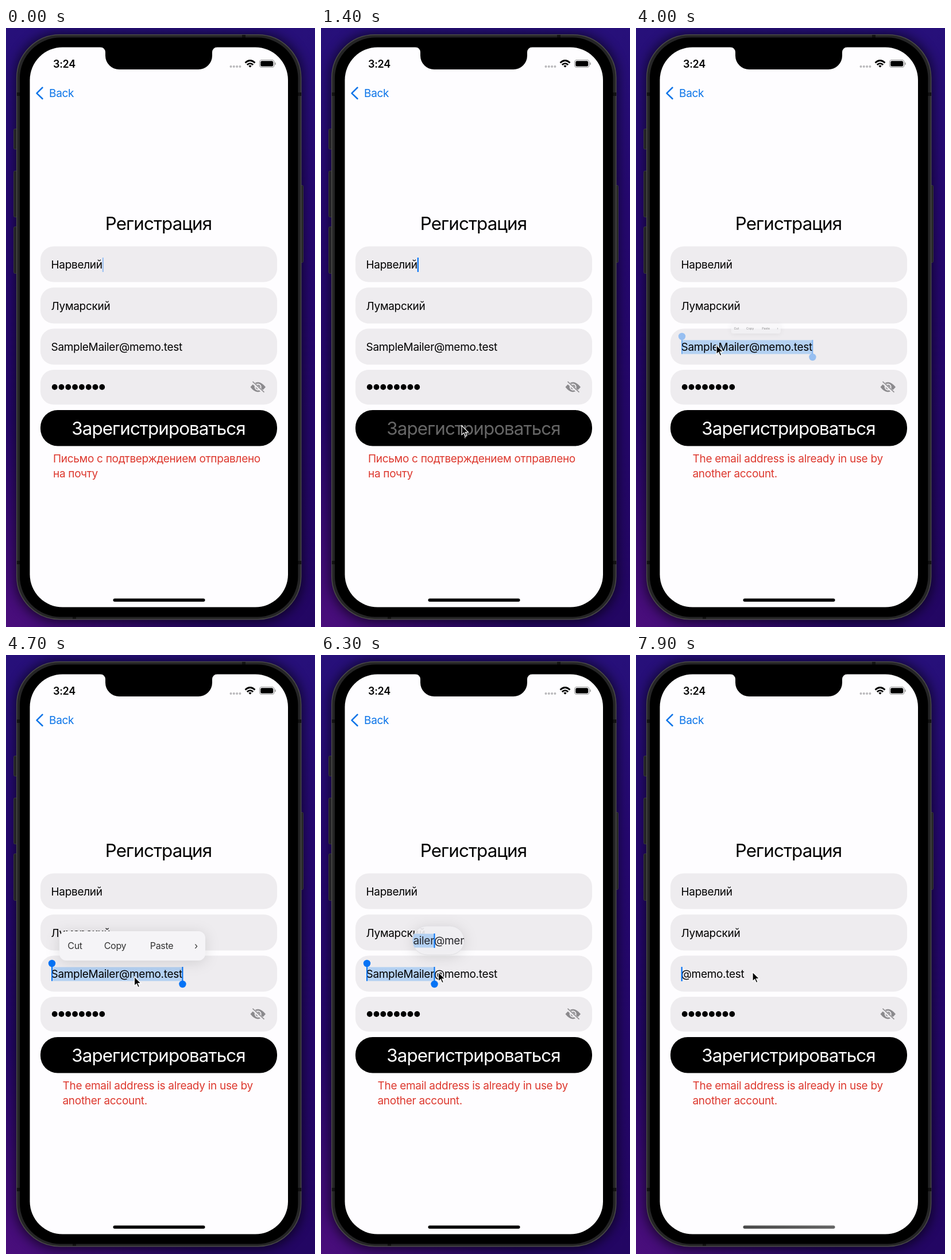
An HTML page for the animation above (8000 ms loop, 538 by 1041 pixels).

```html
<!DOCTYPE html>
<html lang="ru">
<head>
<meta charset="utf-8">
<style>
html, body { margin: 0; width: 100%; height: 100%; overflow: hidden; background: #22076c; }
svg { display: block; width: 538px; height: 1041px; }
text { font: 19px Inter, sans-serif; letter-spacing: -.3px; font-optical-sizing: none; white-space: pre; }
.big { font-size: 31.3px; letter-spacing: -.9px; text-anchor: middle; }
.time { font-size: 18px; font-weight: 600; }
.error { fill: #dd382e; }
.menu text { font-size: 16px; text-anchor: middle; fill: #333; }
.menu rect, .lens { filter: drop-shadow(0 3px 12px rgba(0, 0, 0, .12)); }
.blue { fill: #0573f5; }
.sel { fill: #b4d1f2; }
</style>
</head>
<body>
<svg viewBox="0 0 538 1041">
  <defs>
    <linearGradient id="sky" x2="0" y2="1">
      <stop stop-color="#27107a"/><stop offset=".3" stop-color="#25086f"/>
      <stop offset="1" stop-color="#230663"/>
    </linearGradient>
    <radialGradient id="glow" gradientUnits="userSpaceOnUse" cx="0" cy="1041" r="360">
      <stop stop-color="#4a0e7c"/><stop offset="1" stop-color="#4a0e7c" stop-opacity="0"/>
    </radialGradient>
    <linearGradient id="bar">
      <stop stop-color="#4a4a4a"/><stop offset="1" stop-color="#666"/>
    </linearGradient>
    <filter id="blur" x="-10%" y="-10%" width="120%" height="120%"><feGaussianBlur stdDeviation="10"/></filter>
    <clipPath id="capsule"><rect x="-45" y="-25" width="90" height="50" rx="25"/></clipPath>
  </defs>

  <rect width="538" height="1041" fill="url(#sky)"/>
  <rect width="538" height="1041" fill="url(#glow)"/>
  <rect x="17" y="10" width="499" height="1022" rx="74" opacity=".65" filter="url(#blur)"/>

  <g fill="#232325" stroke="#39393a">
    <rect x="13.5" y="175.5" width="8" height="35" rx="2"/>
    <rect x="13.5" y="248.5" width="8" height="80" rx="2"/>
    <rect x="13.5" y="345.5" width="8" height="81" rx="2"/>
    <rect x="510" y="273.5" width="7.5" height="134" rx="2"/>
    <rect x="18.7" y="11.7" width="495" height="1016" rx="75" fill="#252526" stroke="#4b4b49" stroke-width="1.5"/>
  </g>
  <path d="M19 115h6M508 115h6M19 929h6M508 929h6M414 12v5M119 1022v5" stroke="#121212" stroke-width="6"/>
  <rect x="24" y="16.5" width="484.5" height="1007" rx="71"/>
  <rect x="41.5" y="33.5" width="449.5" height="973" rx="57" fill="#fefdff"/>
  <path d="M164 33A9 9 0 0 1 173 42V48A24 24 0 0 0 197 72H335A24 24 0 0 0 359 48V42A9 9 0 0 1 368 33Z"/>

  <text class="time" x="82" y="68.5">3:24</text>
  <g fill="#b9b8bb">
    <circle cx="391.5" cy="67" r="2"/><circle cx="396.8" cy="67" r="2"/>
    <circle cx="402.1" cy="67" r="2"/><circle cx="407.4" cy="67" r="2"/>
  </g>
  <g fill="none" stroke="#000" stroke-width="2.8">
    <path d="M416.5 60.5Q425 52.5 433.5 60.5M419.7 64Q425 59.3 430.3 64"/>
    <path d="M422.3 65.8L425 68.8L427.7 65.8Q425 63.8 422.3 65.8Z" fill="#000" stroke="none"/>
    <rect x="441.5" y="55.5" width="25.5" height="13" rx="4" stroke="#999" stroke-width="1.2"/>
    <path d="M469 60v4" stroke="#999" stroke-width="1.5"/>
  </g>
  <rect x="443.2" y="57.2" width="22" height="9.6" rx="2.5"/>

  <path d="M63.5 103.5L53.5 113.3L63.5 123" fill="none" stroke="#0b74e8" stroke-width="2.5" stroke-linecap="round" stroke-linejoin="round"/>
  <text x="75" y="120" fill="#0b74e8">Back</text>
  <text class="big" x="265.5" y="351">Регистрация</text>

  <g fill="#eeecef">
    <rect x="60" y="379.5" width="412" height="62" rx="23"/>
    <rect x="60" y="451" width="412" height="62.5" rx="23"/>
    <rect x="60" y="522.5" width="412" height="62.5" rx="23"/>
    <rect x="60" y="594" width="412" height="60.5" rx="23"/>
  </g>
  <text id="name" x="78.5" y="418">Нарвелий</text>
  <text x="78.5" y="489.5">Лумарский</text>
  <rect id="trail" class="sel" x="79" y="542.5" height="24" opacity=".3"/>
  <rect id="selection" class="sel" x="79" y="542.5" height="24"/>
  <text id="email" x="78.5" y="561"></text>
  <g id="dots"></g>

  <path d="M425.5 624Q438.500 607 452 624Q438.500 641 425.5 624Z" fill="#8b8a8d"/>
  <circle cx="438.7" cy="624" r="5" fill="#8b8a8d" stroke="#eeecef" stroke-width="2"/>
  <path d="M429 615.5L449 634" stroke="#eeecef" stroke-width="4.5"/>
  <path d="M429.5 614.5L449.5 633" stroke="#8b8a8d" stroke-width="1.7"/>

  <rect x="60" y="664" width="412" height="62.5" rx="30"/>
  <text id="submit" class="big" x="265.5" y="706.5" fill="#fff">Зарегистрироваться</text>
  <text id="line1" class="error" y="755"></text>
  <text id="line2" class="error" y="780.5"></text>
  <rect id="home" x="186.5" y="991.5" width="160" height="5.5" rx="2.75"/>

  <rect id="caret" class="blue" width="2.2" height="25"/>
  <g id="handles" class="blue">
    <circle cx="80" cy="536" r="6.2"/><rect x="79" y="541" width="2" height="25.5"/>
    <g id="endHandle"><circle cy="572" r="6.2"/><rect x="-1" y="542" width="2" height="26"/></g>
  </g>
  <g id="menuShort" class="menu"></g>
  <g id="menuLong" class="menu"></g>
  <g id="loupe">
    <rect class="lens" x="-45" y="-25" width="90" height="50" rx="25" fill="#f1f0f3" fill-opacity=".9" stroke="#dedde1"/>
    <g clip-path="url(#capsule)">
      <g id="lensText">
        <rect id="lensSel" class="sel" x="79" y="-11.5" height="24"/>
        <text id="lensEmail" x="78.5" y="7" fill="#26262a"></text>
        <rect id="lensCaret" class="blue" y="-12" width="2" height="25"/>
      </g>
    </g>
  </g>
  <path id="mouse" d="M0 0V16L3.8 12.6L6.4 18.6L9 17.5L6.4 11.7H11.6Z" stroke="#fff" stroke-width="1.2"/>
</svg>
<script>
const $ = id => document.getElementById(id);
const set = (id, attrs) => { for (const k in attrs) $(id).setAttribute(k, attrs[k]); };
const ease = (t, a, b) => { const u = Math.min(1, Math.max(0, (t - a) / (b - a))); return u * u * (3 - 2 * u); };
const within = (t, a, b) => t >= a && t < b;

const LOOP = 8000, STEP = 100;
const EMAIL = 'SampleMailer@memo.test', LOCAL = 12;
const SENT = [82, 'Письмо с подтверждением отправлено', 'на почту'];
const IN_USE = [98.5, 'The email address is already in use by', 'another account.'];
const T = { press: 1300, blur: 1500, error: 1700, select: 3900, drag: 5400, release: 7120, erase: 7660 };

// time, x, y of the pointer tip
const PATH = [
  [500, 330, 1045], [1000, 245, 691], [1900, 245, 691], [2300, 249, 692], [2900, 249, 692],
  [3500, 140, 551], [4400, 140, 551], [5000, 307, 567], [T.drag, 307, 567],
  [5600, 236, 556], [6400, 203, 551], [LOOP, 203, 551]
];
function pointer(t) {
  const i = PATH.findIndex(p => p[0] > t);
  if (i < 1) return PATH[0].slice(1);
  const [t0, x0, y0] = PATH[i - 1], [t1, x1, y1] = PATH[i], k = ease(t, t0, t1);
  return [x0 + (x1 - x0) * k, y0 + (y1 - y0) * k];
}

$('dots').innerHTML = Array.from({ length: 8 }, (_, i) =>
  `<circle cx="${84.7 + i * 11.8}" cy="624" r="4.9"/>`).join('');

function buildMenu(id, width, items) {
  $(id).innerHTML = `<rect y="-51" width="${width}" height="51" rx="12" fill="#f5f4f7"/>` +
    items.map(([label, x]) => `<text x="${x}" y="-20">${label}</text>`).join('');
}
buildMenu('menuShort', 254, [['Cut', 27], ['Copy', 97], ['Paste', 178], ['›', 238]]);
buildMenu('menuLong', 324, [['Cut', 24], ['Copy', 89], ['Paste', 162], ['Look Up', 243], ['›', 308]]);

// Springs up from a point under the menu, then fades
function drawMenu(id, t, start, end, anchor, left) {
  const k = ease(t, start, start + 300), s = .2 + .8 * k;
  set(id, {
    transform: `translate(${anchor + (left - anchor) * s} 531) scale(${s})`,
    opacity: Math.min(1, k * 3) * (1 - ease(t, end - 20, end + 80))
  });
}

$('email').textContent = $('lensEmail').textContent = EMAIL;
const stops = Array.from({ length: EMAIL.length }, (_, i) => 79 + $('lensEmail').getSubStringLength(0, i + 1));
const nameEnd = 79 + $('name').getComputedTextLength();
const nearest = x => stops.reduce((a, b) => Math.abs(b - x) < Math.abs(a - x) ? b : a);
const selectionEnd = t => t < T.drag ? stops.at(-1) : nearest(pointer(t)[0] - 6);

function draw(t) {
  const [mx, my] = pointer(t), erased = t >= T.erase;
  const selected = within(t, T.select, T.erase), end = selectionEnd(t);

  set('mouse', { transform: `translate(${mx} ${my})`, opacity: t < 500 ? 0 : 1 });
  set('submit', { opacity: within(t, T.press, T.press + 200) ? .4 : 1 });

  const [x, first, second] = t < T.error ? SENT : IN_USE;
  set('line1', { x }); set('line2', { x });
  $('line1').textContent = first;
  $('line2').textContent = second;
  $('email').textContent = erased ? EMAIL.slice(LOCAL) : EMAIL;
  set('home', { fill: t < 6500 ? '#000' : 'url(#bar)' });

  const phase = t % 1000;
  const blink = Math.min(1, .35 + phase / 150) * (1 - ease(phase, 600, 750));
  set('caret', erased
    ? { x: 78.6, y: 542, opacity: 1 }
    : { x: nameEnd - .5, y: 399, opacity: t < T.blur ? blink : 0 });

  set('selection', { width: end - 79, opacity: selected ? 1 : 0 });
  set('trail', { width: selectionEnd(t - 150) - 79, opacity: selected ? .3 : 0 });
  set('handles', { opacity: selected ? .37 + .63 * ease(t, 4000, 4200) : 0 });
  set('endHandle', { transform: `translate(${end} 0)` });

  drawMenu('menuShort', t, T.select + 20, T.drag, 203, 93);
  drawMenu('menuLong', t, T.release, T.erase - 60, 150, 50);

  const k = ease(t, 5440, 5710) * (1 - ease(t, 7165, 7345));
  const lx = pointer(t - 60)[0] - 2;
  set('loupe', { transform: `translate(${lx} ${554 - 58 * k})`, opacity: Math.min(1, k * 1.2) });
  set('lensText', { transform: `translate(${-lx} 0)` });
  set('lensSel', { width: end - 79 });
  set('lensCaret', { x: end - 1 });
}

function tick() {
  draw(Math.floor(performance.now() % LOOP / STEP) * STEP);
  requestAnimationFrame(tick);
}
tick();
</script>
</body>
</html>
```
